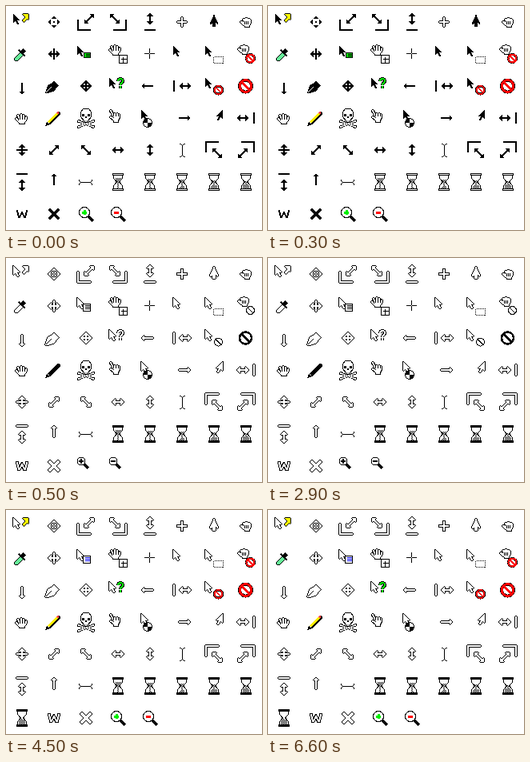
An HTML page that plays this animation: 320 px wide and 280 px high, repeating every 8000 ms.

```html
<!DOCTYPE html>
<html lang="en">
<head>
<meta charset="utf-8">
<title>Cursor sheet</title>
<style>
html, body { margin: 0; width: 100%; height: 100%; overflow: hidden; background: #fff; }
svg { display: block; width: 320px; height: 280px; }
</style>
</head>
<body>
<svg viewBox="0 0 320 280" shape-rendering="crispEdges">
  <defs>
    <pattern id="sand" width="2" height="2" patternUnits="userSpaceOnUse">
      <path d="M0 0h1v1h1v1h-1v-1h-1z"/>
    </pattern>
  </defs>
  <g id="sheet"></g>
</svg>
<script>
const DARK = 0, LIGHT = 1, COLOUR = 2;
let mode = DARK;

const tint = (c, plain = '#fff') => mode === LIGHT ? plain : c;
const move = (x, y, s) => `<g transform="translate(${x} ${y})">${s}</g>`;
const turn = (a, s) => `<g transform="rotate(${a})">${s}</g>`;
const flip = (x, y, s) => `<g transform="scale(${x} ${y})">${s}</g>`;
const fill = (d, c = '#000') => `<path d="${d}" fill="${c}"/>`;
const line = (d, w = 1, c = '#000', f = 'none') =>
  `<path d="${d}" fill="${f}" stroke="${c}" stroke-width="${w}"/>`;
const pen = (d, f) => move(.5, .5, line(d, 1, '#000', f));
const disc = (x, y, r, f = '#fff', w = 1, c = '#000') =>
  `<circle cx="${x}" cy="${y}" r="${r}" fill="${f}" stroke="${c}" stroke-width="${w}"/>`;

// A shape with a one pixel black rim.
const rim = (d, c = '#fff') =>
  [[1, 0], [-1, 0], [0, 1], [0, -1]].map(([x, y]) => move(x, y, fill(d))).join('') + fill(d, c);
const ink = d => mode === DARK ? fill(d) : rim(d);
const inkLine = (d, w) => `<g stroke-linecap="square">${
  mode === DARK ? line(d, w) : line(d, w + 2) + line(d, w, '#fff')}</g>`;

const rect = (x, y, w, h) => `M${x} ${y}h${w}v${h}h${-w}z`;
const swapped = (x, y, w, h) => rect(y, x, h, w);
const head = (y, n, dir, box = rect) => Array.from({ length: n }, (_, i) =>
  box(-1 - i, dir > 0 ? y + i : y - i - 1, 2 * i + 2, 1)).join('');
const heads = (n, box) => head(-7, n, 1, box) + head(7, n, -1, box);
const span = box => heads(4, box) + box(-1, -4, 2, 8);
const upDown = span(rect), leftRight = span(swapped);
const diagonal = 'M.5-6H6V-.5L4-2.5-2.5 4-.5 6H-6V.5L-4 2.5 2.5-4z';

const pointer = (x, y) => move(x, y,
  (mode === DARK ? '' : fill(rect(-1, -1, 1, 1))) +
  ink('M0-.5L8 7.5V8H5L7 12V13H5L3 9 0 11.5z'));
const single = a => turn(a, ink(head(-10, 3, 1) + rect(-1, -7, 2, 11)));
const double = a => turn(a, ink(upDown));
const slant = (x = 1) => flip(x, 1, ink(diagonal));
const edge = a => turn(a, ink(rect(-7, 9, 14, 2)) + move(0, -4, ink(upDown)));
const corner = (x, y) => flip(x, y, ink('M-11-3h2v12h15v2h-17z') + move(4, -4, ink(diagonal)));
const split = a => turn(a, ink(upDown + rect(-7, -1, 14, 2)));
const pan = () => ink(heads(3, rect) + heads(3, swapped) + rect(-1, -1, 2, 2));

const openHand = (x, y) => move(x, y,
  pen('M4 8V7L2 3V2L3 1H4L5 2 6 4V1L7 0H8L9 1H11L12 2V4L14 3 15 4V7L14 8V9L12 11V13H5V12L2 9 0 7V6L1 5H2L4 7', '#fff') +
  pen('M6 4V7M9 1V7M12 4V7'));
const fist = (x, y) => move(x, y,
  pen('M4 4L3 3V2L4 1H6L7 0H9L10 1H12L14 3V7L12 10V12H6V11L3 9 0 6V5L1 4H3L4 5z', '#fff') +
  pen('M6 4V8M8 4V8M10 4V8'));
const finger = () => move(-12, -11,
  pen('M5 9L1 2V1L2 0H3L4 1 6 5 7 4H8L9 5 10 4H11L12 5H13L14 6V10L12 14V16H6V14L1 10V9L2 8H3z', '#fff') +
  pen('M6 5V8M9 5V8M12 5V8'));

const ban = (x, y, r, w) => {
  const k = r * .7, slash = `M${x - k} ${y - k}L${x + k} ${y + k}`;
  const ring = (w, c) => disc(x, y, r, 'none', w, c) + line(slash, w, c);
  const edge = disc(x, y, r, '#fff', w + 1);
  return mode === LIGHT ? disc(x, y, r) + ring(w > 2 ? w - .5 : 1, '#000') : edge + ring(w, '#f00');
};

const plus = () => {
  const inner = rect(-6, -1, 12, 2) + rect(-1, -6, 2, 12);
  return mode === DARK ? rim(inner) : fill(rect(-7, -2, 14, 4) + rect(-2, -7, 4, 14)) + fill(inner, '#fff');
};
const cross = () => fill(rect(-7, -1, 6, 1) + rect(0, -1, 6, 1) + rect(-1, -7, 1, 6) + rect(-1, 0, 1, 6));

const dropper = () => rim('M-2-2L1 1-6 8H-9V6z', tint('#6e9')) +
  line('M-4-5L4 3', 2) + line('M-1-1L3-5', 5);
const menu = () => mode === DARK
  ? pen('M-3-2H5V4H-3z', '#0d0') + pen('M-1 0H4M-1 2H4')
  : pen('M-4-3H5V6H-4z', '#fff') +
    move(.5, .5, line('M-2-1H4M-2 1H4M-2 3H4', 1, mode === COLOUR ? '#00f' : '#000'));
const nib = () => ink('M-11 9L-8-1-2-4 0-7 6 0 3 2 1 6-8 9z') +
  line('M-10 8L-3 1', 1, mode === DARK ? '#fff' : '#000');
const query = () => {
  const d = 'M0-6C0-10 6-10 6-6 6-4 3-4 3-1M3 0V3';
  return line(d, 4) + line(d, 2, tint('#0e0', '#fff'));
};
const pencil = () => fill('M-11 10L-9 5 4-8H6L8-6V-4L-5 8z') +
  line('M-7 5.5L4-5.5', 3, tint('#fe0', '#000')) +
  line('M4-5.5L6-7', 3, tint('#f44', '#000')) + line('M-8 5L-6 7', 1, '#fff');
const skull = () => {
  const bones = 'M-9 4L9 11M9 4L-9 11';
  const ends = [[-9, 4], [-9, 11], [9, 4], [9, 11]].map(([x, y]) => disc(x, y, 1.5)).join('');
  return ends + line(bones, 3) + line(bones, 1.5, '#fff') +
    pen('M-6 0L-7-3V-8L-4-12H3L6-8V-3L5 0 3 1V5H-4V1z', '#fff') +
    fill(rect(-5, -5, 3, 3) + rect(2, -5, 3, 3) + rect(-1, -2, 2, 2) +
      rect(-2, 3, 1, 2) + rect(1, 3, 1, 2));
};
const target = () => move(-3, 6, disc(0, 0, 5.5) +
  fill('M0 0V-5.5A5.5 5.5 0 0 0-5.5 0zM0 0H5.5A5.5 5.5 0 0 1 0 5.5z'));
const beam = a => turn(a, pen('M-4-8H-2L0-6V6L-2 8H-4M3-8H2L0-6M0 6L2 8H3'));

const glass = k => {
  const cap = mode === DARK ? '#fff' : '#000';
  const low = 8 - k, w = Math.min(5, 2 + k);
  return line('M-5.5-9V-4.5L-1.5 0-5.5 4.5V9M5.5-9V-4.5L1.5 0 5.5 4.5V9') +
    fill(`M${-4 + k * .6}${-5 + k}H${4 - k * .6}L1 0V${low}H-1V0z`, 'url(#sand)') +
    fill(`M0 ${low - 2}L${w - 1} ${low}V9H${1 - w}V${low}z`, 'url(#sand)') +
    [-10.5, 8.5].map(y => line(rect(-6.5, y, 13, 2), 1, '#000', cap)).join('');
};

const zoom = (d, c) => {
  const small = mode === LIGHT;
  const s = line(small ? 'M1 1L7 7' : 'M2 2L9 9', 3) +
    disc(-2, -2, small ? 5 : 6.5) + line(d, small ? 2 : 3, tint(c, '#000'));
  return small ? move(-4, -4, s) : s;
};

const icons = () => [
  pointer(-11, -10) + rim('M0-10H8V-2L6-4 2 0 0-2 4-6z', tint('#ff0')),
  pan(), corner(1, 1), corner(-1, 1), edge(0), plus(),
  ink('M-1-9H1V-7L5 1V3H4L2 1V6H-2V1L-4 3H-5V1L-1-7z'), fist(-8, -6),

  dropper(), split(90), pointer(-11, -10) + menu(),
  openHand(-12, -12) + pen('M1 1H11V11H1z', '#fff') + pen('M3 6H10M6 3V10'),
  cross(), pointer(-11, -10),
  pointer(-11, -10) + `<path d="M-.5 3.5H11.5V11.5H-.5z" fill="none" stroke="#000" stroke-dasharray="1" stroke-dashoffset="1"/>`,
  fist(-11, -12) + ban(5.5, 5.5, 5, 2),

  single(180), nib(), ink(upDown + leftRight), pointer(-11, -10) + query(),
  single(-90), edge(90), pointer(-11, -10) + ban(5.5, 5, 5, 2), ban(-.5, 0, 7.5, 3),

  openHand(-9, -6), pencil(), skull(), finger(), pointer(-11, -10) + target(),
  single(90), flip(-1, 1, pointer(-11, -10)), edge(-90),

  split(0), slant(), slant(-1), double(90), double(0), beam(0), corner(1, -1), corner(-1, -1),

  edge(180), single(0), beam(90),
  ...Array.from({ length: mode === COLOUR ? 6 : 5 }, (_, k) => glass(k)),

  inkLine('M-6-4L-4 4H-3L0-2 3 4H4L6-4', 2), inkLine('M-5-5L5 5M5-5L-5 5', 3),
  zoom('M-5-2H1M-2-5V1', '#0e0'), zoom('M-5-2H1', '#f00')
];

const sheet = document.getElementById('sheet');
let shown = -1;

function draw(t) {
  mode = t < 500 ? DARK : t < 4500 ? LIGHT : COLOUR;
  if (mode === shown) return;
  shown = mode;
  sheet.innerHTML = icons().map((s, i) => move(20 + i % 8 * 40, 20 + (i >> 3) * 40, s)).join('');
}

const start = performance.now();
function tick() {
  draw((performance.now() - start) % 8000);
  requestAnimationFrame(tick);
}
tick();
</script>
</body>
</html>
```
